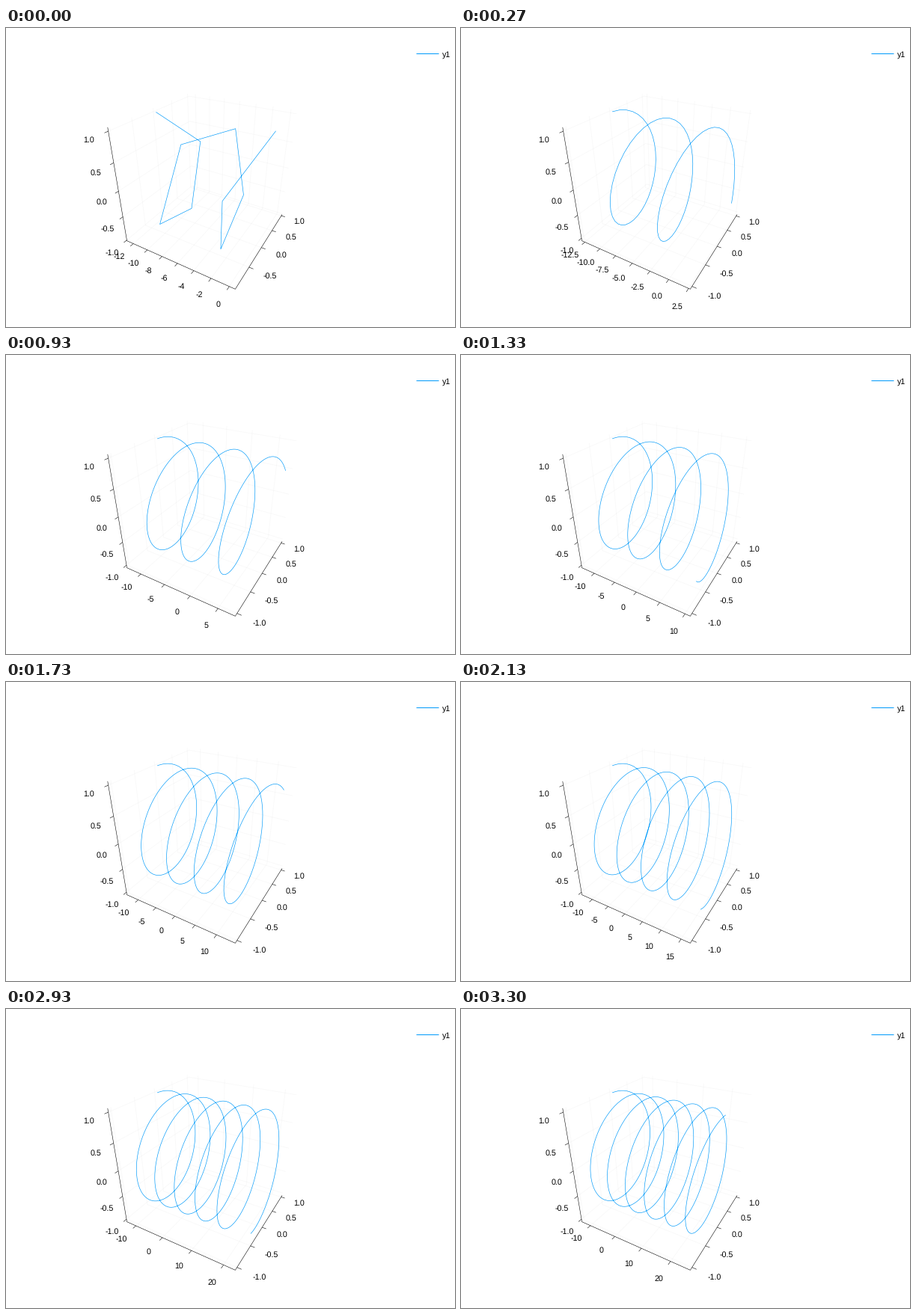
Recreate the animation shown at these times as a matplotlib script. Size 600 by 400 pixels, loop 3330 ms.

```python
import math

import matplotlib.pyplot as plt
import numpy as np
from matplotlib.animation import FuncAnimation
from matplotlib.collections import LineCollection

plt.rcParams["text.hinting"] = "none"

W, H, DPI = 600, 400, 100
PX = 72 / DPI
STATES = 100
TICKS_PER_LOOP = 333  # clock ticks of 10 ms
BLUE = "#009AFA"
FONT = dict(family="Liberation Sans", size=10.67 * PX, color="black")

# Perspective camera: azimuth 30, elevation 30, 40 degree field of view
AZ, EL = math.radians(-60), math.radians(30)
EYE = np.array([math.cos(EL) * math.cos(AZ), math.cos(EL) * math.sin(AZ), math.sin(EL)])
RIGHT = np.array([-math.sin(AZ), math.cos(AZ), 0])
UP = np.cross(EYE, RIGHT)
DIST = math.sqrt(3) / math.sin(math.radians(20))
SCALE = 421
CENTER = np.array([271.2, 200.5])

TICK, LABEL = 0.07, 0.333

fig = plt.figure(figsize=(W / DPI, H / DPI), dpi=DPI, facecolor="white")
ax = fig.add_axes([0, 0, 1, 1])
ax.set_xlim(0, W)
ax.set_ylim(H, 0)
ax.axis("off")

grid = LineCollection([], colors=[(0, 0, 0, 0.025)], linewidths=PX)
frame_lines = LineCollection([], colors="black", linewidths=0.55 * PX)
ax.add_collection(grid)
ax.add_collection(frame_lines)
curve, = ax.plot([], [], color=BLUE, lw=0.65 * PX, solid_joinstyle="round")
ax.plot([548, 578], [34, 34], color=BLUE, lw=PX, solid_capstyle="butt")
ax.text(583, 38.6, "y1", ha="left", va="baseline", **FONT)
labels = []


def project(points):
    """Map points of the cube [-1, 1]^3 to stage pixels."""
    p = np.asarray(points, float)
    depth = DIST - p @ EYE
    flat = np.stack([p @ RIGHT, -(p @ UP)], axis=-1)
    return CENTER + SCALE * flat / depth[..., None]


def widen(values):
    lo, hi = values.min(), values.max()
    pad = 0.03 * (hi - lo)
    return lo - pad, hi + pad


def unit(v, lim):
    return 2 * (v - lim[0]) / (lim[1] - lim[0]) - 1


def ticks(lim, step):
    first, last = math.ceil(lim[0] / step), math.floor(lim[1] / step)
    return [i * step for i in range(first, last + 1)]


def x_step(top):
    for bound, step in ((2, 2), (5, 2.5), (20, 5)):
        if top < bound:
            return step
    return 10


def add_label(point, text):
    x, y = project(point)
    labels.append(ax.text(x, y + 0.8, text, ha="center", va="center", **FONT))


def draw(tick):
    while labels:
        labels.pop().remove()

    # 30 states per second, each starting on the nearest clock tick
    i = int(0.3 * (tick + 0.5)) + 1
    t = np.linspace(-4 * math.pi, 8 * math.pi * i / STATES, 10 * i)
    data = [t, np.sin(t), np.cos(t)]
    xlim, ylim, zlim = lims = [widen(d) for d in data]
    path = project(np.stack([unit(d, lim) for d, lim in zip(data, lims)], axis=-1))
    curve.set_data(path[:, 0], path[:, 1])

    walls = []
    edges = [[(1, 1, -1), (1, -1, -1), (-1, -1, -1), (-1, -1, 1)]]

    step = x_step(xlim[1])
    digits = 1 if step == 2.5 else 0
    for v in ticks(xlim, step):
        n = unit(v, xlim)
        walls.append([(n, -1, -1), (n, 1, -1), (n, 1, 1)])
        edges.append([(n, -1, -1), (n, -1 - TICK, -1)])
        add_label((n, -1 - LABEL, -1), f"{v:.{digits}f}")
    for v in ticks(ylim, 0.5):
        n = unit(v, ylim)
        walls.append([(1, n, -1), (-1, n, -1), (-1, n, 1)])
        edges.append([(1, n, -1), (1 + TICK, n, -1)])
        add_label((1 + LABEL, n, -1), f"{v:.1f}")
    for v in ticks(zlim, 0.5):
        n = unit(v, zlim)
        walls.append([(-1, -1, n), (-1, 1, n), (1, 1, n)])
        edges.append([(-1, -1, n), (-1, -1 - TICK, n)])
        add_label((-1, -1 - LABEL, n), f"{v:.1f}")

    grid.set_segments([project(s) for s in walls])
    frame_lines.set_segments([project(s) for s in edges])
    return [grid, frame_lines, curve, *labels]


anim = FuncAnimation(fig, draw, frames=TICKS_PER_LOOP, interval=10, repeat=True)
plt.show()
```
